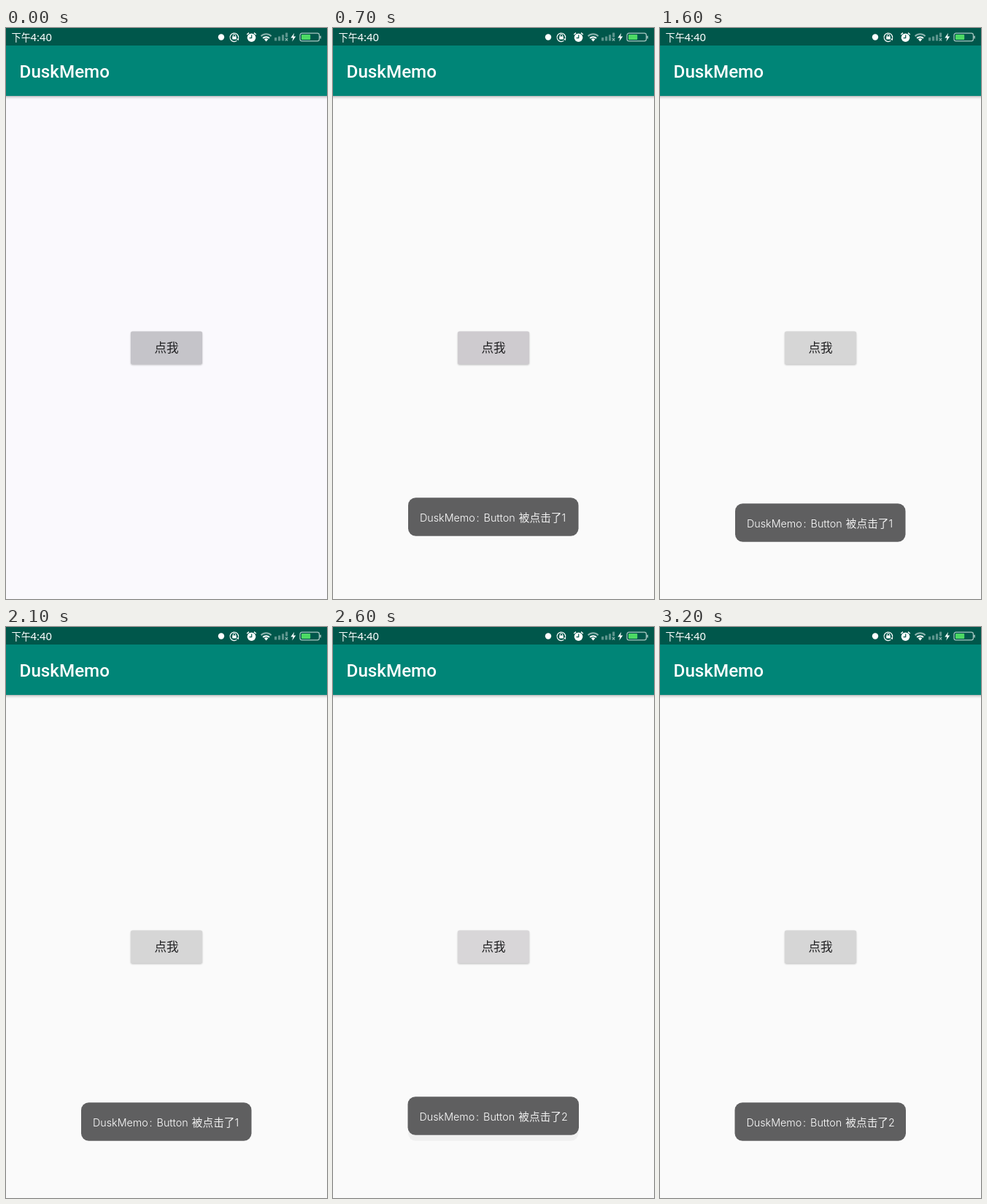
An HTML page that plays this animation: 440x782 px, repeating every 3300 ms.

```html
<!DOCTYPE html>
<html lang="zh-CN">
<head>
<meta charset="utf-8">
<title>DuskMemo</title>
<style>
  html, body { margin: 0; width: 100%; height: 100%; overflow: hidden; background: #fafafa; }
  svg { display: block; width: 440px; height: 782px; }
  .clock { font: 13.2px "Noto Sans CJK SC", "Noto Sans CJK", sans-serif; fill: #fff; }
  .digits { font: 14.8px "Noto Sans", sans-serif; }
  .title { font: 500 24.2px Roboto, sans-serif; fill: #fff; }
  .label { font: 16.6px "Noto Sans CJK SC", "Noto Sans CJK", sans-serif; fill: #202022; }
  .toast text { font: 300 14.3px Inter, sans-serif; fill: #fff; }
  .toast .han { font: 300 14.7px "Noto Sans CJK SC", "Noto Sans CJK", sans-serif; fill-opacity: .9; }
</style>
</head>
<body>
<svg viewBox="0 0 440 782">
  <defs>
    <linearGradient id="barShade" x2="0" y2="1">
      <stop offset="0" stop-opacity=".28"/>
      <stop offset=".4" stop-opacity=".1"/>
      <stop offset="1" stop-opacity="0"/>
    </linearGradient>
    <filter id="soft" x="-10%" y="-20%" width="120%" height="140%">
      <feGaussianBlur stdDeviation="1"/>
    </filter>
  </defs>

  <rect id="page" width="440" height="782"/>

  <!-- app bar -->
  <rect y="93" width="440" height="5" fill="url(#barShade)"/>
  <rect y="24" width="440" height="69" fill="#008577"/>
  <text class="title" x="18.6" y="68">DuskMemo</text>

  <!-- status bar -->
  <rect width="440" height="24" fill="#00574b"/>
  <text class="clock" x="7.6" y="18">下午</text>
  <text class="clock digits" x="33.6" y="18">4:40</text>
  <circle cx="295" cy="12.5" r="4.2" fill="#fff"/>

  <g fill="none" stroke="#fff" stroke-width="1.2">
    <path d="M316.4 17.4A5.8 5.8 0 1 1 318.6 13.6"/>
    <path d="M311.2 12v-1.6a1.8 1.8 0 0 1 3.6 0V12" stroke-width="1"/>
  </g>
  <rect x="310.2" y="11.6" width="5.6" height="4" rx=".5" fill="#fff"/>
  <path d="M316 15.2l3.2-1.6-.5 3.6z" fill="#fff"/>

  <circle cx="336.5" cy="13.2" r="5.8" fill="#fff"/>
  <path d="M330.2 9l2.8-2.4M342.8 9l-2.8-2.4" stroke="#fff" stroke-width="1.4"/>
  <path d="M336.7 9.6v4H333.6" fill="none" stroke="#00574b" stroke-width="1.2"/>

  <g fill="none" stroke="#fff" stroke-width="2">
    <path d="M349.6 11.2a9.7 9.7 0 0 1 14 0" opacity=".55"/>
    <path d="M352.2 14a6.2 6.2 0 0 1 8.8 0"/>
  </g>
  <path d="M353.9 15.6a3.8 3.8 0 0 1 5.4 0l-2.7 2.8z" fill="#fff"/>

  <g fill="#fff" opacity=".36">
    <rect x="368" y="13" width="3.2" height="4.6" rx=".6"/>
    <rect x="373" y="11.4" width="3.2" height="6.2" rx=".6"/>
    <rect x="378" y="9.2" width="3.2" height="8.4" rx=".6"/>
    <rect x="383" y="6.6" width="3.2" height="6" rx=".6"/>
  </g>
  <path d="M382.8 14l3.4 3.6m0-3.6l-3.4 3.6" stroke="#fff" stroke-width="1.1" opacity=".6"/>

  <path d="M395.2 6.8l-4.9 6.8h3.2l-1.3 5 5-7.2h-3.2z" fill="#fff"/>

  <rect x="403" y="7.2" width="26.4" height="10.7" rx="2.6" fill="none" stroke="#a9c7c2" stroke-width="1.2"/>
  <rect x="430.3" y="10.4" width="1.6" height="4.4" rx=".8" fill="#a9c7c2"/>
  <rect x="405" y="9.1" width="12.2" height="6.9" rx=".8" fill="#4cd964"/>

  <!-- button -->
  <rect x="171" y="416.4" width="98" height="45" rx="2.5" opacity=".24" filter="url(#soft)"/>
  <rect id="button" x="171" y="415.5" width="98" height="45" rx="2.2"/>
  <text class="label" x="220" y="444" text-anchor="middle">点我</text>

  <g id="toasts"></g>
</svg>

<script>
  const LOOP = 3300, STEP = 100, REST = 651;
  const ENTER = 300, RISE = 64;
  const $ = id => document.getElementById(id);

  // [start ms, colour]
  const buttonTones = [
    [0, '#c5c4c9'], [600, '#cfcdd2'], [700, '#cecbcf'], [1000, '#d1cfd2'],
    [1100, '#d6d6d6'], [2400, '#cccacc'], [2500, '#d1cfd1'],
    [2600, '#d8d6d8'], [2800, '#d6d6d6']
  ];
  const pageTones = [[0, '#faf9fd'], [700, '#fafafa']];

  // alpha: [start ms, opacity]
  const toasts = [
    { count: 1, x: 103, width: 233.5, born: 543,
      alpha: [[0, 0], [600, .51], [700, 1], [2500, .6], [2600, .06], [2700, 0]] },
    { count: 2, x: 102.5, width: 234.5, born: 2455,
      alpha: [[0, 0], [2500, .4], [2600, 1]] }
  ];

  for (const toast of toasts) {
    const { x, width, count } = toast;
    $('toasts').insertAdjacentHTML('beforeend', `<g class="toast">
      <rect x="${x}" y=".2" width="${width}" height="52.6" rx="10.5" fill="#5f5f60"/>
      <text x="${x + 16}" y="32.6">DuskMemo</text>
      <text x="${x + 93.6}" y="32.6">:</text>
      <text x="${x + 103.6}" y="32.6">Button</text>
      <text class="han" x="${x + 151.8}" y="32.6">被点击了</text>
      <text x="${x + 210.6}" y="32.6">${count}</text></g>`);
    toast.node = $('toasts').lastElementChild;
  }

  const at = (table, t) => table.findLast(row => row[0] <= t)[1];

  const overshoot = p => {
    const q = Math.min(1, Math.max(0, p)) - 1;
    return q * q * (3 * q + 2) + 1;
  };

  function draw(time) {
    const t = Math.floor((time % LOOP) / STEP) * STEP;
    $('page').setAttribute('fill', at(pageTones, t));
    $('button').setAttribute('fill', at(buttonTones, t));
    for (const { node, born, alpha } of toasts) {
      const y = REST + RISE * (1 - overshoot((t - born) / ENTER));
      node.setAttribute('transform', `translate(0 ${Math.round(y)})`);
      node.setAttribute('opacity', at(alpha, t));
    }
  }

  const start = performance.now();
  function tick() {
    draw(performance.now() - start);
    requestAnimationFrame(tick);
  }
  tick();
</script>
</body>
</html>
```
